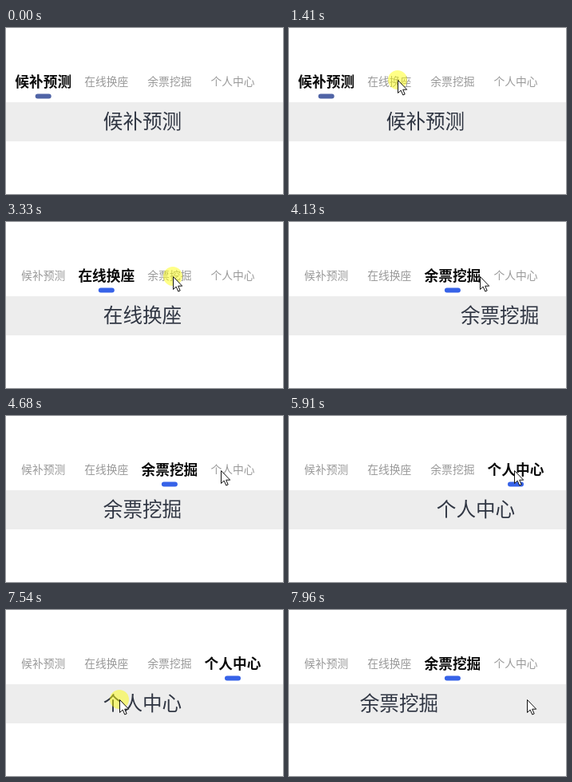
Recreate the animation shown at these times as an HTML page with a canvas. Size 347 by 208 pixels, loop 8000 ms.

```html
<!DOCTYPE html>
<html lang="zh-CN">
<head>
<meta charset="utf-8">
<style>
html, body { margin: 0; width: 100%; height: 100%; overflow: hidden; background: #fff; }
canvas { display: block; }
</style>
</head>
<body>
<canvas id="stage"></canvas>
<script>
const WIDTH = 347, HEIGHT = 208, LOOP = 8000;
const SLIDE = 500, HOLD = 150;
const FONT = '"Noto Sans CJK SC", "Noto Sans CJK", sans-serif';
const tabs = ['候补预测', '在线换座', '余票挖掘', '个人中心'];

// Pointer moves in a straight line, or bows down by `dip`
const moves = [
  { leave: 130, arrive: 750, x: 136, y: 65 },
  { leave: 1610, arrive: 2250, x: 209, y: 68 },
  { leave: 3590, arrive: 4920, x: 282.4, y: 67.5 },
  { leave: 5910, arrive: 6730, x: 265, y: 115 },
  { leave: 6790, arrive: 7480, x: 142, y: 112, dip: 17 },
  { leave: 7560, arrive: 7700, x: 298, y: 112 },
];
const presses = [1410, 3200, 5160, 7490];
const DRAG_START = 7560;

// `shown` delays the first visible moment of a page that is already sliding
const slides = [
  { start: 2021, shown: 2225, page: 1 },
  { start: 3890, page: 2 },
  { start: 5624, page: 3 },
  { start: 7640, page: 2 },
];

const canvas = document.getElementById('stage');
const ctx = canvas.getContext('2d');
const ratio = window.devicePixelRatio || 1;
canvas.width = WIDTH * ratio;
canvas.height = HEIGHT * ratio;
canvas.style.width = WIDTH + 'px';
canvas.style.height = HEIGHT + 'px';
ctx.scale(ratio, ratio);
ctx.textAlign = 'center';

const clamp = v => Math.min(1, Math.max(0, v));

function pointerAt(t) {
  let x = 300, y = HEIGHT;
  for (const m of moves) {
    const k = clamp((t - m.leave) / (m.arrive - m.leave));
    x += (m.x - x) * k;
    y += (m.y - y) * k + (m.dip || 0) * Math.sin(Math.PI * k);
  }
  return { x, y };
}

const dragged = t => t < DRAG_START ? 0 : pointerAt(t).x - pointerAt(DRAG_START).x;

// A tap slides a full page; a drag has already covered part of the way
function viewAt(t) {
  const slide = slides.filter(s => t >= (s.shown || s.start)).pop();
  if (!slide) return { page: 0, scroll: 0 };
  const { page, start } = slide;
  const pull = dragged(start);
  const distance = pull ? WIDTH - pull : -WIDTH;
  const rest = 1 - clamp((t - start) / SLIDE);
  const scroll = page * WIDTH + distance * rest ** 2 - (pull ? 0 : dragged(t));
  return { page, scroll };
}

function text(label, x, baseline, font, color) {
  ctx.font = `${font} ${FONT}`;
  ctx.fillStyle = color;
  ctx.fillText(label, x, baseline);
}

function drawPointer(t) {
  const { x, y } = pointerAt(t);
  if (presses.some(down => t >= down && t < down + HOLD)) {
    ctx.fillStyle = 'rgba(255, 255, 0, 0.47)';
    ctx.beginPath();
    ctx.arc(x, y, 12, 0, 2 * Math.PI);
    ctx.fill();
  }
  ctx.save();
  ctx.translate(Math.round(x) + 0.5, Math.round(y) + 0.5);
  const arrow = new Path2D('M0 0V16L3.7 12.6L6.3 18.5L8.7 17.5L6.2 11.7H11.2Z');
  ctx.fillStyle = '#fff';
  ctx.strokeStyle = '#111';
  ctx.fill(arrow);
  ctx.stroke(arrow);
  ctx.restore();
}

function draw(t) {
  const { page, scroll } = viewAt(t);
  ctx.fillStyle = '#fff';
  ctx.fillRect(0, 0, WIDTH, HEIGHT);
  ctx.fillStyle = '#ededed';
  ctx.fillRect(0, 93, WIDTH, 49);

  tabs.forEach((label, i) => {
    const x = 46.7 + 79.1 * i;
    if (i === page) {
      text(label, x, 74, 'bold 17.7px', '#0a0a0a');
      ctx.fillStyle = page ? '#3763e8' : '#5064a6';
      ctx.beginPath();
      ctx.roundRect(x - 10, 82.5, 20, 6, 3);
      ctx.fill();
    } else {
      text(label, x, 72, '13.8px', '#999');
    }
    text(label, 171 + i * WIDTH - scroll, 126, '24.6px', '#303643');
  });
  if (t >= moves[0].leave) drawPointer(t);
}

function tick() {
  draw(performance.now() % LOOP);
  requestAnimationFrame(tick);
}
tick();
</script>
</body>
</html>
```
